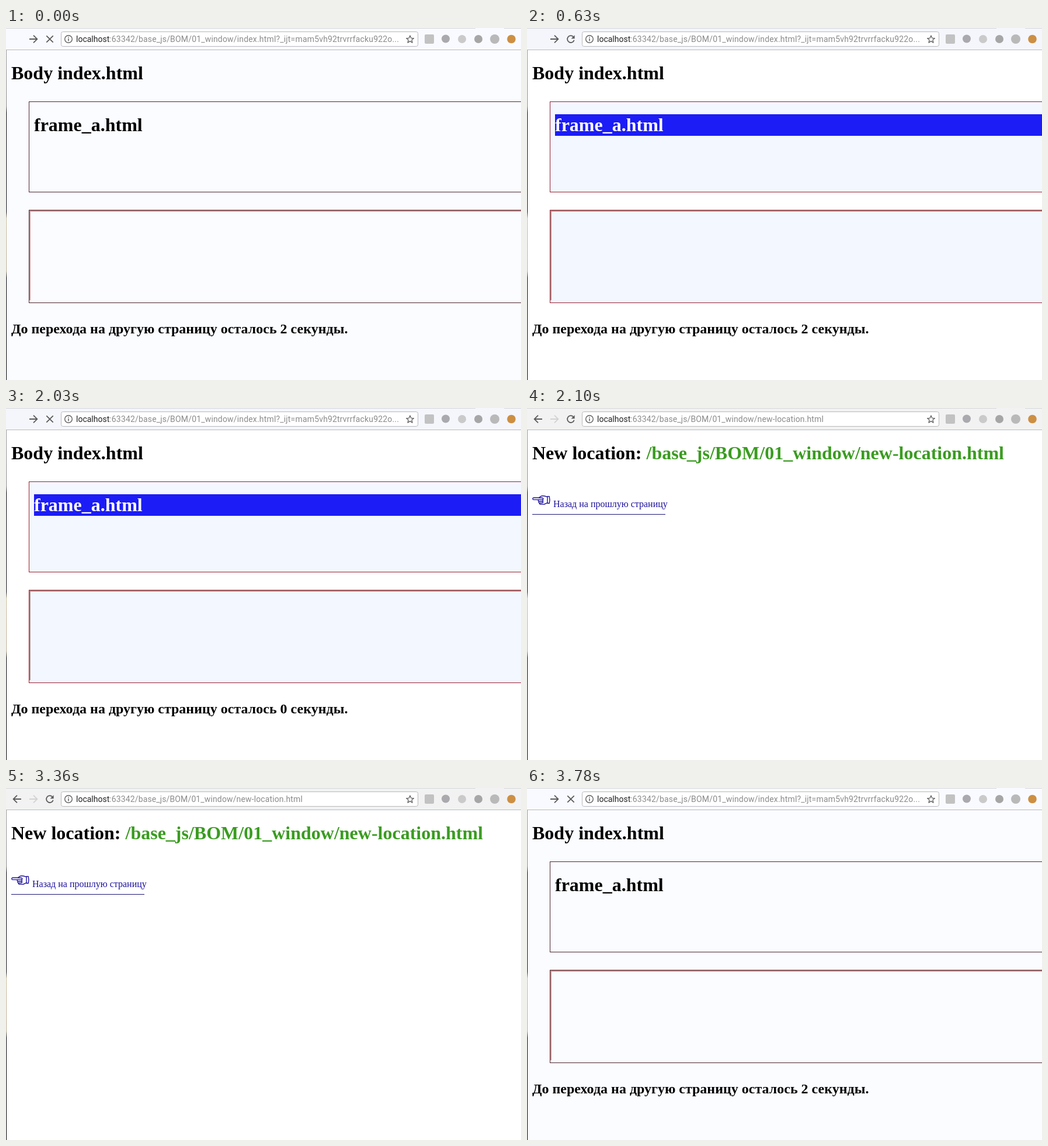
These frames come from a looping animation (882x604 px, 3.85 s). An HTML page:

```html
<!DOCTYPE html>
<html lang="ru">
<head>
<meta charset="utf-8">
<title>Page redirect countdown</title>
<style>
html, body { margin: 0; width: 100%; height: 100%; overflow: hidden; background: #fff; }
svg { display: block; width: 882px; height: 604px; }
text { white-space: pre; }
.serif { font-family: "Liberation Serif", "Times New Roman", serif; }
.h1 { font-size: 32px; font-weight: bold; }
.h2 { font-size: 24px; font-weight: bold; }
.url { font: 14px Roboto, sans-serif; }
.line { fill: none; stroke: #5a5a5a; stroke-width: 1.8; }
</style>
</head>
<body>
<svg viewBox="0 0 882 604">
  <defs>
    <linearGradient id="edge" x1="0" y1="0" x2="0" y2="1">
      <stop offset="0" stop-color="#9a9a9a"/>
      <stop offset=".17" stop-color="#8a8a8a"/>
      <stop offset=".19" stop-color="#0a0a10"/>
      <stop offset=".49" stop-color="#15151c"/>
      <stop offset=".51" stop-color="#c9bd9c"/>
      <stop offset=".67" stop-color="#b9ab90"/>
      <stop offset=".69" stop-color="#0a0a10"/>
      <stop offset="1" stop-color="#050508"/>
    </linearGradient>
  </defs>

  <rect id="paper" width="882" height="604"/>

  <g id="bar">
    <rect id="barFill" width="882" height="37"/>
    <rect y="37" width="882" height="1" fill="#b9bac0"/>
    <path d="M0 .5H804M853 .5H882" stroke="#d4d5d9"/>
    <path id="back" class="line" d="M26 19H13M19 12.6L12.6 19L19 25.4"/>
    <path id="forward" class="line" d="M40 19H53M47 12.6L53.4 19L47 25.4"/>
    <path id="stop" class="line" d="M69.3 13.3L80.7 24.7M80.7 13.3L69.3 24.7"/>
    <g id="reload">
      <path class="line" d="M79.3 15A5.9 5.9 0 1 0 80.7 20.7"/>
      <path d="M81.6 12.2V18.2H75.6Z" fill="#5a5a5a"/>
    </g>
    <rect x="94.5" y="6.5" width="611" height="25" rx="3" fill="#fff" stroke="#b8b8bb"/>
    <circle cx="107" cy="19" r="6.3" fill="none" stroke="#5f5f5f" stroke-width="1.4"/>
    <path d="M107 18V22.6M107 15.3V16.8" stroke="#5f5f5f" stroke-width="1.5"/>
    <text class="url" x="120" y="24" fill="#8b8b8b"><tspan fill="#242424">localhost</tspan><tspan id="path"></tspan></text>
    <path d="M692 13L693.8 17.3L698.4 17.6L694.9 20.6L696 25.1L692 22.6L688 25.1L689.1 20.6L685.6 17.6L690.2 17.3Z"
      fill="none" stroke="#5f5f5f" stroke-width="1.3" stroke-linejoin="round"/>
    <rect x="717" y="11" width="16" height="16" rx="2" fill="#c2c2c2"/>
    <circle cx="753" cy="18.5" r="7" fill="#a9a9ae"/>
    <circle cx="781" cy="19" r="7" fill="#cacaca"/>
    <circle cx="809" cy="19" r="7" fill="#a6a6a6"/>
    <circle cx="837" cy="19" r="8" fill="#b9b9b9"/>
    <circle cx="865.5" cy="19" r="7.3" fill="#cd8f42"/>
  </g>

  <g id="home" class="serif">
    <text class="h1" x="9" y="88">Body index.html</text>
    <rect id="boxA" x="39.5" y="126.5" width="860" height="155"/>
    <rect id="mark" x="48" y="148" width="834" height="37" fill="#1c1cf7"/>
    <text id="frameName" class="h1" x="48" y="177">frame_a.html</text>
    <rect id="boxB" x="39.5" y="312.5" width="860" height="159"/>
    <path id="inset" d="M41 467V314H882" fill="none" stroke-width="1.4"/>
    <text class="h2" x="9" y="524">До перехода на другую страницу осталось <tspan id="count"></tspan> секунды.</text>
  </g>

  <g id="next" class="serif">
    <text class="h1" x="9" y="88">New location: <tspan fill="#3a9c20">/base_js/BOM/01_window/new-location.html</tspan></text>
    <g fill="none" stroke="#1c119c" stroke-width="1.4" stroke-linejoin="round">
      <path d="M35 152.6C31 151 27 149.8 23.5 151.6L20.5 154H11.5A1.7 1.7 0 0 0 11.5 157.4H21"/>
      <path d="M20.5 154.2H26C28.5 154.4 28.5 157.3 26 157.4H20.5C18.6 157.8 18.8 160.2 20.8 160.3H26"/>
      <path d="M20.8 160.3C19.4 161 19.8 163 21.5 163H26M21.5 163C21 164.6 22 165.4 23.5 165.4H28C31 165.2 32.5 163.4 35 162.6"/>
      <path d="M26 157.4C28 157.8 28 160 26 160.3C28 160.8 28 162.8 26 163"/>
      <path d="M35 151.6H38.2Q39.6 157.5 38.2 163.5H35Z"/>
    </g>
    <text x="45" y="170" font-size="16" fill="#1c119c">Назад на прошлую страницу</text>
    <rect x="9" y="182" width="228" height="1" fill="#1c1478"/>
  </g>

  <rect y="38" width="1" height="566" fill="url(#edge)"/>
</svg>
<script>
const LOOP = 3850, LOADED = 70, TICK_1 = 1050, TICK_0 = 2030, LEAVE = 2100, RETURN = 3780;
const ROOT = ":63342/base_js/BOM/01_window/";
const $ = id => document.getElementById(id);
const show = (id, on) => $(id).style.display = on ? "" : "none";
const paint = (id, fill, stroke) => {
  if (fill) $(id).style.fill = fill;
  if (stroke) $(id).style.stroke = stroke;
};

function render(t) {
  const away = t >= LEAVE && t < RETURN;
  const fresh = t < LOADED || t >= RETURN;
  const loading = fresh || (t >= TICK_0 && !away);

  show("next", away);
  show("home", !away);
  show("back", away);
  show("stop", loading);
  show("reload", !loading);
  show("mark", !fresh);

  paint("paper", fresh ? "#fbfcff" : "#fff");
  paint("barFill", away ? "#f2f2f2" : fresh ? "#f9faff" : "#f4f6fc");
  paint("forward", null, away ? "#d2d2d2" : "#5a5a5a");
  $("forward").style.fill = "none";
  paint("boxA", fresh ? "#fbfcff" : "#f3f7ff", fresh ? "#4c2630" : "#951f30");
  paint("boxB", fresh ? "#fbfcff" : "#f3f7ff", fresh ? "#4c2630" : "#951f30");
  paint("inset", null, fresh ? "#b46a6a" : "#99655f");
  paint("frameName", fresh ? "#000" : "#fff");

  $("path").textContent = ROOT + (away ? "new-location.html" : "index.html?_ijt=mam5vh92trvrrfacku922o...");
  $("path").style.letterSpacing = away ? ".13px" : ".17px";
  $("count").textContent = fresh || t < TICK_1 ? 2 : t < TICK_0 ? 1 : 0;
}

const start = performance.now();
function tick() {
  render((performance.now() - start) % LOOP);
  requestAnimationFrame(tick);
}
render(0);
requestAnimationFrame(tick);
</script>
</body>
</html>
```
